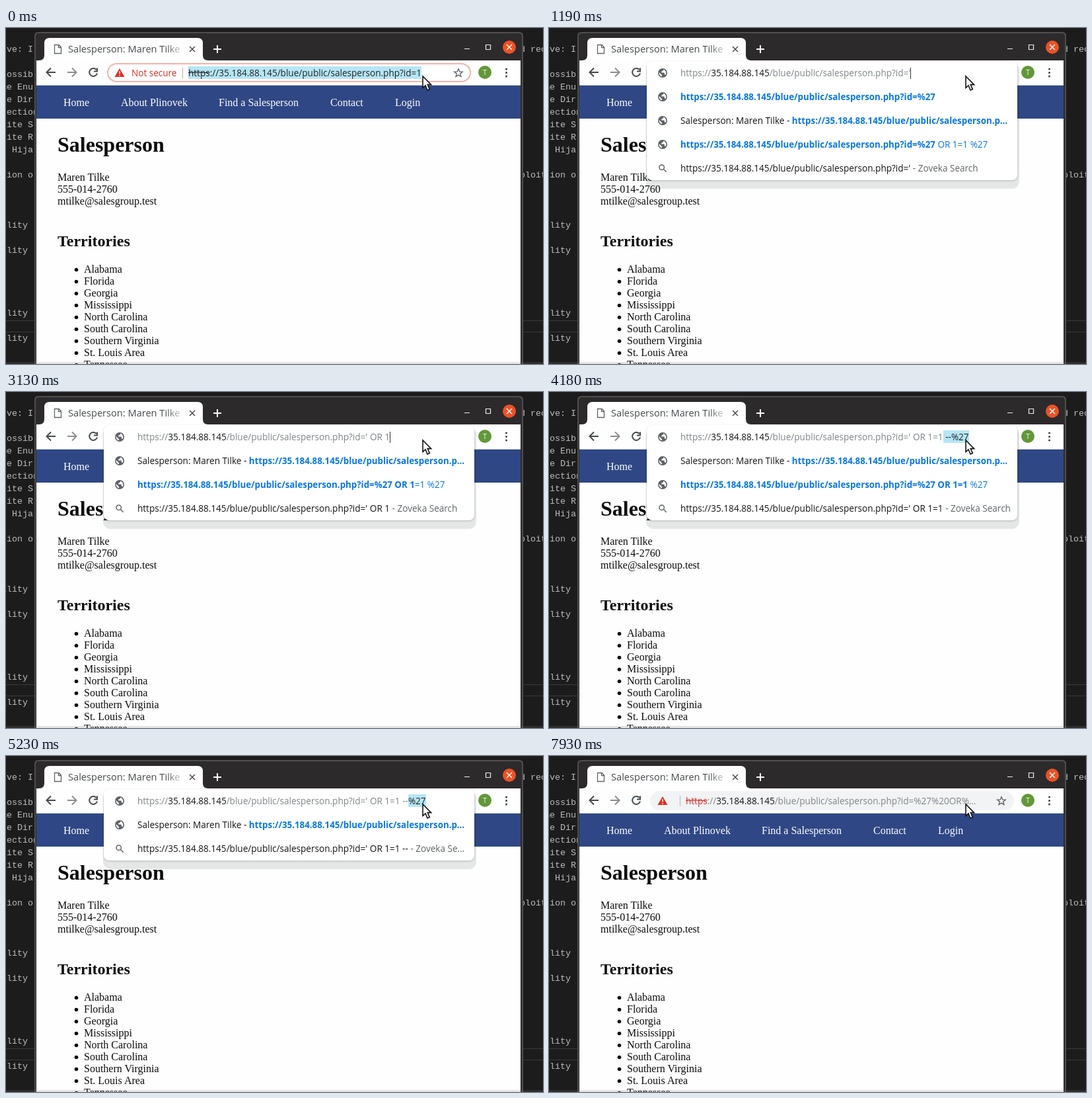
An HTML page for the animation above (8 s loop, 813 px wide and 508 px high).

```html
<!DOCTYPE html>
<html lang="en">
<head>
<meta charset="utf-8">
<title>Address bar</title>
<style>
html, body { margin: 0; width: 100%; height: 100%; overflow: hidden; background: #1c1c1c; }
svg, #omni div { position: absolute; }
svg { left: 0; top: 0; }
text { white-space: pre; }
.term { font: 13.33px "Liberation Mono", monospace; fill: #bdbdbd; }
.page { font: 16px "Liberation Serif", serif; fill: #0c0c0c; }
.ui, #omni { font: 13.57px "Open Sans", sans-serif; }
#omni .pill { left: 153px; top: 53px; width: 551px; height: 29px; border-radius: 15px; box-sizing: border-box; }
#omni .focus { background: #fff; border: 2px solid #f3b3a8; }
#omni .idle { background: #f1f3f4; }
#omni .shade { left: 146.5px; top: 53px; width: 565px; border-radius: 11px; background: rgba(30, 45, 40, .11); filter: blur(.5px); }
#omni .drop { left: 148px; top: 50px; width: 561px; border-radius: 8px; background: #fff; box-shadow: 0 1px 3px rgba(0, 0, 0, .2); }
#omni .hover { left: 608px; top: 86px; width: 89px; height: 36px; background: #f1f1f0; }
#omni .line { height: 36px; line-height: 36px; width: 501px; white-space: pre; overflow: hidden; text-overflow: ellipsis; color: #5f6368; }
#omni .sep { width: 1px; height: 16px; top: 60px; background: #b9b4b4; }
.dark { color: #141416; }
.dim { color: #80868b; }
.red { color: #d93025; }
.blue { color: #0878e0; }
b { font-size: 13.32px; color: #0878e0; }
.sel { background: #b5e6f5; color: #202124; }
.caret { display: inline-block; width: 1px; height: 17px; margin-right: -1px; background: #333; vertical-align: -4px; }
</style>
</head>
<body>
<svg width="813" height="508">
  <defs>
    <g id="globe">
      <circle r="7" fill="#5f6368"/>
      <path d="M-5.4-1L-1 3.2V5.3A5.4 5.4 0 0 1-5.4-1M1-5.3V-3.6L-1.7-2.4V-.6H2.4L3.2 2.6 4.4 3A5.4 5.4 0 0 0 1-5.3" fill="#fff"/>
    </g>
    <g id="search" fill="none" stroke="#5f6368" stroke-width="1.5">
      <circle cx="-1.3" cy="-1.3" r="3.7"/><path d="M1.5 1.5L5.7 5.7"/>
    </g>
    <g id="warn">
      <path d="M0-7L7.5 6H-7.5Z" fill="#d93025"/>
      <path d="M0-2.8V1.6M0 3V4.6" stroke="#fff" stroke-width="1.5"/>
    </g>
    <g id="info" fill="none" stroke="#5f6368" stroke-width="1.5">
      <circle r="6"/><path d="M0-3.2V-1.6M0-.4V3.4"/>
    </g>
  </defs>

  <g id="terminal" class="term"></g>
  <path d="M0 442.5H813M0 459.5H813" stroke="#3a3a3a"/>

  <path d="M43 508V12Q43 6 49 6H777Q783 6 783 12V508Z" fill="#4e4e4e"/>
  <path d="M45 508V13Q45 8 50 8H776Q781 8 781 13V508Z" fill="#2d2a2c"/>
  <path d="M46 49H779V508H46Z" fill="#fefefe"/>
  <path d="M50 49Q58 49 58 41V23Q58 15 66 15H290Q298 15 298 23V41Q298 49 306 49Z" fill="#fff"/>
  <path id="doc" d="M73.5 25.5H80L83.5 29V38.5H73.5ZM79.5 25.5V29.5H83.5" fill="#fff" stroke="#5f6368" stroke-width="1.3"/>
  <path id="spinner" fill="none" stroke="#8a8f94" stroke-width="2"/>
  <linearGradient id="fade" gradientUnits="userSpaceOnUse" x1="242" x2="272">
    <stop stop-color="#45494d"/><stop offset="1" stop-color="#45494d" stop-opacity="0"/>
  </linearGradient>
  <text class="ui" x="94" y="37" style="font-size:14.6px" fill="url(#fade)">Salesperson: Maren Tilke</text>
  <path d="M278 28L286 36M286 28L278 36" stroke="#4a4d51" stroke-width="1.5"/>
  <path d="M314 32H326M320 26V38" stroke="#fff" stroke-width="2"/>
  <path d="M694 31.5H702M726.5 25.5H733.5V32.5H726.5Z" fill="none" stroke="#eee" stroke-width="1.2"/>
  <circle cx="762" cy="29" r="10" fill="#ea5328"/>
  <path d="M758 25L766 33M766 25L758 33" stroke="#fff" stroke-width="1.4"/>

  <g fill="none" stroke="#45494d" stroke-width="2">
    <path d="M75 67H62M68 60.5L61.5 67L68 73.5"/>
    <path d="M93 67H106M100 60.5L106.5 67L100 73.5" stroke="#8b8e91"/>
    <path id="reload" d="M136.7 63A6 6 0 1 0 138 68.5M138 60.5V65.5H133"/>
    <path id="stop" d="M127 62L137 72M137 62L127 72"/>
  </g>
  <circle cx="725" cy="67" r="10" fill="#62983a"/>
  <text class="ui" x="725" y="71" text-anchor="middle" style="font-size:10px" fill="#fff">T</text>
  <path d="M757.5 62V62M757.5 67.5V67.5M757.5 73V73" stroke="#45494d" stroke-width="3.2" stroke-linecap="round"/>
  <path d="M46 86.5H779" stroke="#cfd3da"/>
  <path d="M46 87H779V137H46Z" fill="#2f4785"/>
  <g id="page" class="page"></g>
  <path d="M0 505H813V508H0Z" fill="#777" opacity=".2"/>
</svg>
<div id="omni"></div>
<svg width="813" height="508">
  <path d="M631 73V90.5L635 86.8L638 94L641.3 92.6L638.3 85.6H643.6Z" fill="#fff" stroke="#111" stroke-width="1.6"/>
</svg>

<script>
const $ = id => document.getElementById(id);
const label = (x, y, s, attrs = '') => `<text x="${x}" y="${y}" ${attrs}>${s}</text>`;
const span = (cls, s) => `<span class="${cls}">${s}</span>`;

const person = 'Maren Tilke';
const host = '35.184.88.145', path = '/blue/public/salesperson.php?id=';
const base = 'https://' + host + path;

$('terminal').innerHTML = [
  [1, 36, 've: I'], [-7, 74, 'possib'], [-7, 93, 'me Enu'], [-7, 112, 're Dir'],
  [1, 131, 'ection'], [-7, 150, 'site S'], [-7, 169, 'site R'], [-7, 188, 'n Hija'],
  [-7, 226, 'tion o'], [-7, 302, 'ility'], [-7, 340, 'ility'], [-7, 435, 'ility'],
  [-7, 473, 'ility'], [778, 36, 'd rec'], [778, 226, 'ploit']
].map(a => label(...a)).join('');

const menu = [[87, 'Home'], [174, 'About Plinovek'], [322, 'Find a Salesperson'], [491, 'Contact'], [589, 'Login']];
const states = ['Alabama', 'Florida', 'Georgia', 'Mississippi', 'North Carolina', 'South Carolina',
  'Southern Virginia', 'St. Louis Area', 'Tennessee'];
$('page').innerHTML =
  menu.map(([x, s]) => label(x, 118, s, 'fill="#fff"')).join('') +
  label(78, 187, 'Salesperson', 'style="font-size:32px;font-weight:700"') +
  [person, '555-014-2760', 'mtilke@salesgroup.test'].map((s, i) => label(78, 231 + 18 * i, s)).join('') +
  label(78, 330, 'Territories', 'style="font-size:24px;font-weight:700"') +
  states.map((s, i) => `<circle cx="106.5" cy="${365.5 + 18 * i}" r="2.8"/>` + label(118, 370 + 18 * i, s)).join('');

const icon = (name, y) =>
  `<svg style="left:160px;top:${y - 12}px" width="24" height="24" viewBox="-12 -12 24 24"><use href="#${name}"/></svg>`;
const line = (x, y, s) => `<div class="line" style="left:${x}px;top:${y - 18}px">${s}</div>`;
const sep = x => `<div class="sep" style="left:${x}px"></div>`;
const star = `<svg style="left:677px;top:60px" width="16" height="16" viewBox="-8 -8 16 16">
  <path d="M0-6.2L1.7-2.1 6.2-1.8 2.7 1.1 3.9 5.5 0 3.1-3.9 5.5-2.7 1.1-6.2-1.8-1.7-2.1Z" fill="none" stroke="#5f6368" stroke-width="1.4"/></svg>`;
const caret = '<i class="caret"></i>';
const struck = span('red', '<s>https</s>') + span('dim', '://');
const address = rest => span('dark', host) + span('dim', path + rest);

// Suggestion rows by kind: u url, o first record, q quote, s page title, h history, g web search
const encode = s => s.trimEnd().replace(/'/g, '%27');
const past = '%27 OR 1=1 %27';
const suggest = {
  u: s => `<b>${base + encode(s)}</b>`,
  o: () => `<b>${base}</b>` + span('blue', '1'),
  q: () => `<b>${base}</b>` + span('blue', '%27'),
  s: () => span('dark', `Salesperson: ${person} - `) + '<b>https://35.184.88.145/blue/public/salesperson.p…</b>',
  h: s => `<b>${base + encode(s)}</b>` + span('blue', past.slice(encode(s).length)),
  g: s => span('dark', base + s.trimEnd()) + ' - Zoveka Search'
};

const focused = selected => () =>
  '<div class="pill focus"></div>' + icon('warn', 68) + line(190, 68, span('red', 'Not secure')) + sep(267) +
  line(276, 68, selected ? span('sel', `<s>https</s>://${host + path}1`) : struck + address('1') + caret) + star;

const typing = (typed, kinds, { sel = '', blink = false, hover = false } = {}) => () => {
  const height = 36 * (kinds.length + 1);
  const tail = sel ? span('sel', sel) : blink ? '' : caret;
  return '<div class="pill focus"></div>' +
    `<div class="shade" style="height:${height + 10}px"></div><div class="drop" style="height:${height}px"></div>` +
    (hover ? '<div class="hover"></div>' : '') +
    icon('globe', 68) + line(199, 68, span('dim', 'https://') + address(typed) + tail) +
    [...kinds].map((k, i) => {
      const y = 104 + 36 * i;
      return icon(k === 'g' ? 'search' : 'globe', y) + line(199, y, suggest[k](typed));
    }).join('');
};

const loading = () => '<div class="pill idle"></div>' + icon('info', 68) +
  line(199, 68, span('dim', 'https://') + address('%27%20OR%20…')) + star;
const loaded = () => '<div class="pill idle"></div>' + icon('warn', 68) + sep(198) +
  line(207, 68, struck + address('%27%20OR%…')) + star;

const steps = [
  [0, focused(true)],
  [300, focused(false)],
  [890, typing('', 'ushqg')],
  [1040, typing('', 'uoshqg')],
  [1190, typing("'", 'ushg')],
  [1480, typing("' ", 'ushg')],
  [1630, typing("' O", 'shg')],
  [1780, typing("' OR", 'shg')],
  [1930, typing("' OR ", 'ushg')],
  [2380, typing("' OR ", 'ushg', { blink: true })],
  [2830, typing("' OR ", 'ushg')],
  [3130, typing("' OR 1", 'shg')],
  [3730, typing("' OR 1=", 'shg')],
  [4180, typing("' OR 1=1", 'shg', { sel: ' --%27' })],
  [4780, typing("' OR 1=1 ", 'ushg')],
  [5080, typing("' OR 1=1 -", 'sg', { sel: '-%27' })],
  [5230, typing("' OR 1=1 --", 'sg', { sel: '%27' })],
  [6580, typing("' OR 1=1 --'", 'sg', { hover: true })],
  [7180, typing("' OR 1=1 --'", 'sg', { hover: true, blink: true })],
  [7630, loading, 'M78 25A7 7 0 0 0 74 26.5'],
  [7780, loading, 'M78 25A7 7 0 0 0 71.5 32'],
  [7930, loaded]
];

const show = (id, on) => $(id).style.display = on ? '' : 'none';
let current;
function tick() {
  const t = performance.now() % 8000;
  const step = steps.findLast(([at]) => at <= t);
  if (step !== current) {
    current = step;
    const [, view, arc] = step;
    $('omni').innerHTML = view();
    $('spinner').setAttribute('d', arc || '');
    show('doc', !arc);
    show('reload', !arc);
    show('stop', arc);
  }
  requestAnimationFrame(tick);
}
tick();
</script>
</body>
</html>
```
